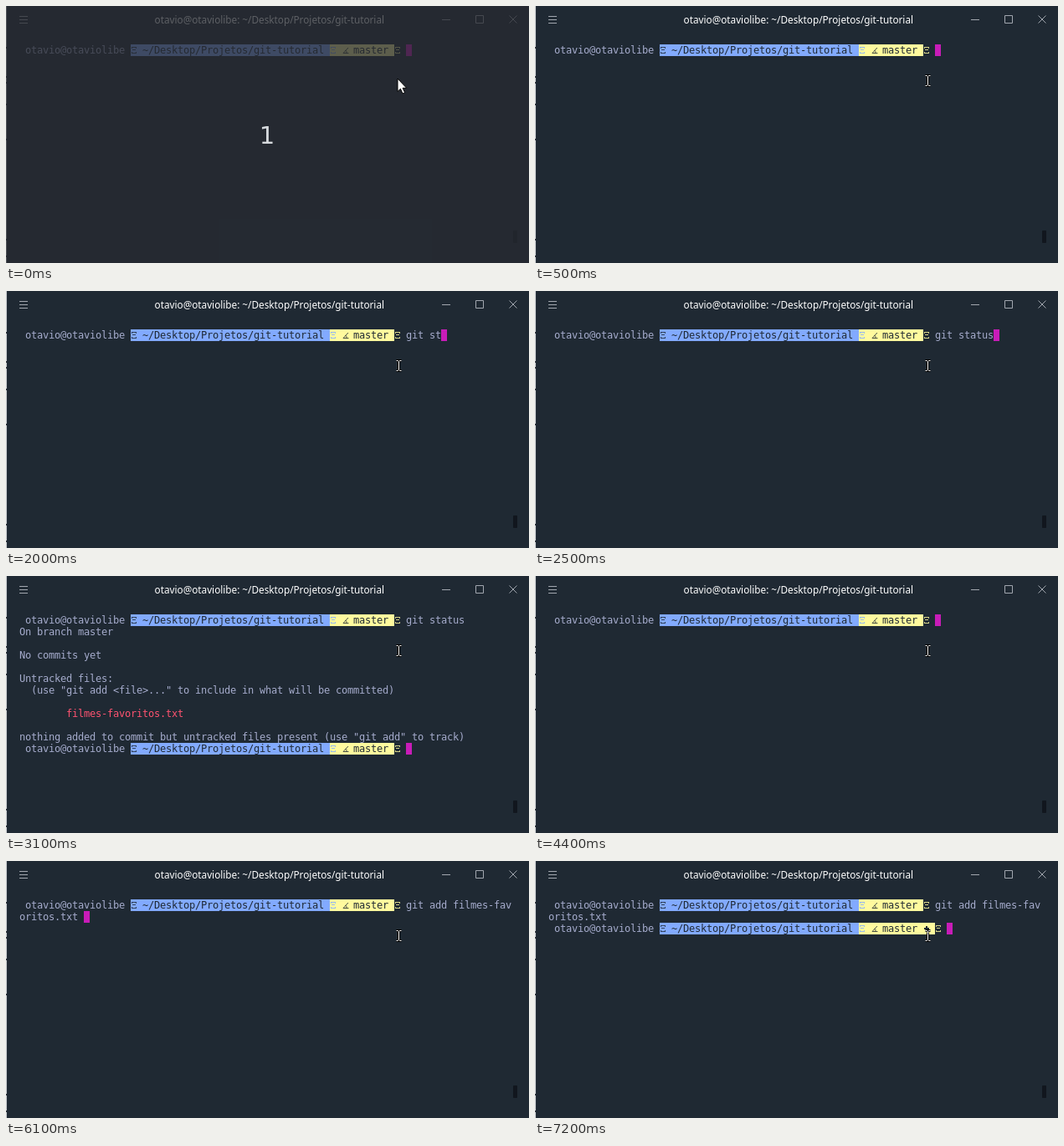
These frames come from a looping animation (625x308 px, 8 s). An HTML page:

```html
<!DOCTYPE html>
<html lang="pt">
<head>
<meta charset="utf-8">
<title>Terminal</title>
<style>
html, body { margin: 0; width: 100%; height: 100%; overflow: hidden; background: #1f2933; }
svg { display: block; width: 625px; height: 308px; }
text { white-space: pre; }
.mono { font: 12px "DejaVu Sans Mono", monospace; }
.title { font: 11.75px "Noto Sans", sans-serif; fill: #fff; }
.count { font: 29px "DejaVu Sans", sans-serif; fill: #d6d9dd; }
.line { fill: none; stroke: #a3a8b0; }
</style>
</head>
<body>
<svg viewBox="0 0 625 308" xmlns="http://www.w3.org/2000/svg">
  <rect width="625" height="308" fill="#1f2933"/>
  <path d="M.5 0V308" stroke="#c9ccd0"/>
  <path d="M.5 49v2M.5 84v2M.5 91v2M.5 117v2M.5 159v2M.5 279v2M.5 299v2" stroke="#30343a"/>
  <text class="title" x="314.800" y="21" text-anchor="middle">otavio@otaviolibe: ~/Desktop/Projetos/git-tutorial</text>
  <path class="line" d="M16 12.5h10M16 16.5h10M16 20.5h10M521 16.5h10M561.5 11.5h9v9h-9zM601.5 11.5l9 9m0-9l-9 9"/>
  <rect x="606" y="269" width="5" height="15" rx="1" fill="#11161e"/>
  <g id="screen"></g>
  <g id="overlay">
    <rect width="625" height="308" fill="#272a31" fill-opacity=".75"/>
    <text class="count" x="312" y="165" text-anchor="middle">1</text>
    <path d="M468 87v15.500l3.400-3.200 2.600 5.600 2.600-1.200-2.500-5.400h4.600z" fill="#fff" stroke="#000"/>
  </g>
  <g id="beam" fill="none">
    <path d="M466.500 83.500h2l1 1 1-1h2M469.500 84.500v10M466.500 95.500h2l1-1 1 1h2" stroke="#000" stroke-width="3"/>
    <path d="M466.500 83.500h2l1 1 1-1h2M469.500 84.500v10M466.500 95.500h2l1-1 1 1h2" stroke="#fff"/>
  </g>
</svg>
<script>
const LOOP = 8000, LEFT = 16, TOP = 46, CW = 7, CH = 14;
const BG = '#1f2933', FG = '#a6accd', BLUE = '#82aaff', YELLOW = '#fffa9e', RED = '#ff5370', CURSOR = '#c81cb8';
const GLYPH = {
  bars: 'M1 3.5H7M2 6.5H6M1 10.5H7M1.5 4V5M6.5 4V5M1.5 9V10M6.5 9V10',
  branch: 'M8 4L2 10.5H8.5M4.5 7Q6.5 8 6 10.5',
  plus: 'M1 7H7M4 4V10'
};
const $ = id => document.getElementById(id);
const px = col => LEFT + col * CW;
const py = row => TOP + row * CH;

function put(col, row, str, fill = FG) {
  const xs = [...str].map((_, i) => px(col + i)).join(' ');
  const safe = str.replace(/</g, '&lt;').replace(/>/g, '&gt;');
  return `<text class="mono" x="${xs}" y="${py(row) + 11}" fill="${fill}">${safe}</text>`;
}
const block = (col, row, n, fill) =>
  `<rect x="${px(col)}" y="${py(row)}" width="${n * CW}" height="${CH}" fill="${fill}"/>`;
const glyph = (name, col, row, color, w = 0.8) =>
  `<path d="${GLYPH[name]}" transform="translate(${px(col)} ${py(row)})" fill="none" stroke="${color}" stroke-width="${w}"/>`;
const cursor = (col, row) => block(col, row, 1, CURSOR);

function prompt(row, staged) {
  const end = staged ? 66 : 64;
  return put(1, row, 'otavio@otaviolibe')
    + block(19, row, 34, BLUE) + block(53, row, end - 53, YELLOW)
    + glyph('bars', 19, row, BG)
    + put(21, row, '~/Desktop/Projetos/git-tutorial', BG)
    + glyph('bars', 53, row, BLUE)
    + glyph('branch', 55, row, BG)
    + put(57, row, 'master', BG)
    + (staged ? glyph('plus', 64, row, BG, 2) : '')
    + glyph('bars', end, row, YELLOW);
}

const typed = str => prompt(0) + put(66, 0, str) + cursor(66 + str.length, 0);

function status() {
  return prompt(0) + put(66, 0, 'git status')
    + put(0, 1, 'On branch master')
    + put(0, 3, 'No commits yet')
    + put(0, 5, 'Untracked files:')
    + put(2, 6, '(use "git add <file>..." to include in what will be committed)')
    + put(8, 8, 'filmes-favoritos.txt', RED)
    + put(0, 10, 'nothing added to commit but untracked files present (use "git add" to track)')
    + prompt(11) + cursor(66, 11);
}

const added = () => prompt(0) + put(66, 0, 'git add filmes-fav') + put(0, 1, 'oritos.txt');

// [time, characters typed]
const STATUS_KEYS = [[1300, 1], [1400, 3], [1500, 4], [1700, 5], [2000, 6], [2100, 7], [2200, 8], [2300, 9], [2500, 10]];
const ADD_KEYS = [[4700, 1], [4800, 2], [4900, 3], [5000, 4], [5200, 6], [5400, 7], [5900, 9]];
const count = (keys, t) => keys.reduce((n, [at, len]) => t >= at ? len : n, 0);

function screenAt(t) {
  if (t < 3100) return typed('git status'.slice(0, count(STATUS_KEYS, t)));
  if (t < 4400) return status();
  if (t < 6100) return typed('git add f'.slice(0, count(ADD_KEYS, t)));
  if (t < 7200) return added() + cursor(11, 1);
  return added() + prompt(2, true) + cursor(68, 2);
}

let shown = '';
function draw(t) {
  const intro = t < 500;
  $('overlay').style.display = intro ? '' : 'none';
  $('beam').style.display = intro ? 'none' : '';
  const next = screenAt(t);
  if (next !== shown) $('screen').innerHTML = shown = next;
}

const start = performance.now();
function tick() {
  draw((performance.now() - start) % LOOP);
  requestAnimationFrame(tick);
}
tick();
</script>
</body>
</html>
```
